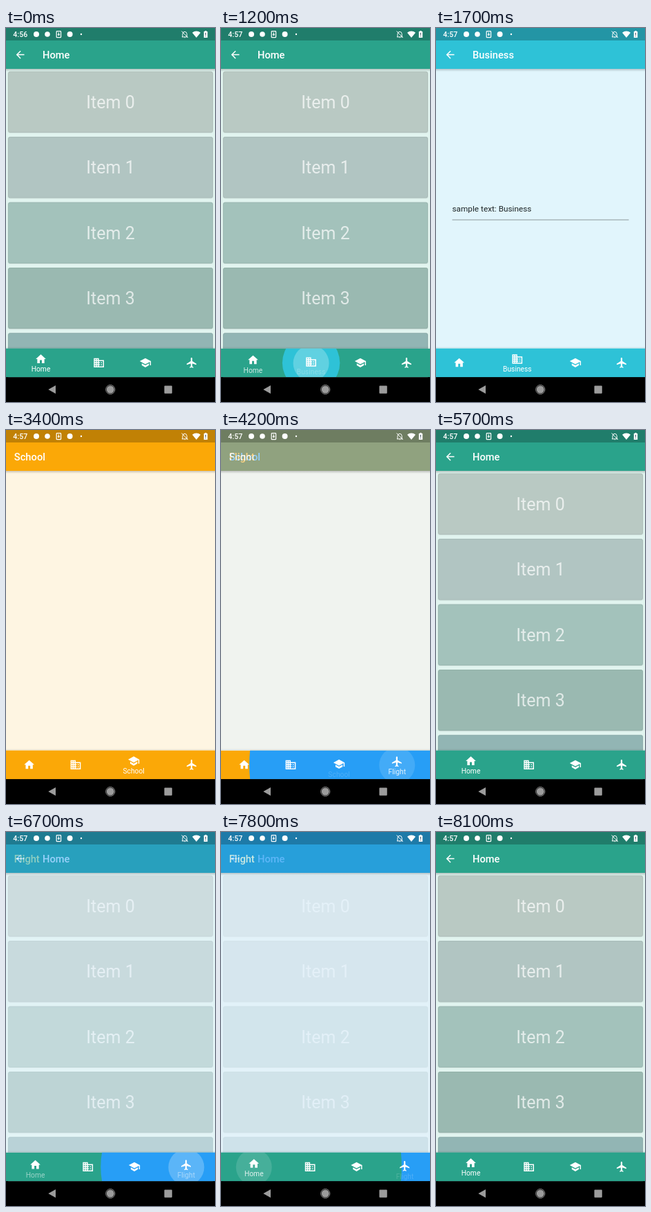
Animation of 303 by 540 pixels, one loop 8.7 s. Source, as an HTML page:

```html
<!DOCTYPE html>
<html lang="en">
<head>
<meta charset="utf-8">
<title>Bottom navigation</title>
<style>
  html, body { margin: 0; width: 100%; height: 100%; overflow: hidden; background: #000; }
  svg { display: block; width: 100vw; height: 100vh; font-family: Roboto, sans-serif; }
  .title { font-size: 14.7px; font-weight: 500; fill: #fff; }
  .item { font-size: 25px; fill: #fff; fill-opacity: .7; text-anchor: middle; }
  .label { font-size: 10.3px; fill: #fff; text-anchor: middle; }
</style>
</head>
<body>
<svg viewBox="0 0 303 540">
  <defs>
    <clipPath id="navClip"><rect y="462.7" width="303" height="41.5"/></clipPath>
    <linearGradient id="shade" x2="0" y2="1">
      <stop stop-opacity=".2"/><stop offset="1" stop-opacity="0"/>
    </linearGradient>
  </defs>
  <g id="pages"></g>

  <g id="status" fill="#fff">
    <text id="clock" x="10.3" y="13.1" font-size="10.6" font-weight="500"></text>
    <circle cx="44" cy="9" r="4"/>
    <circle cx="60" cy="9" r="3.8"/>
    <rect x="73.2" y="4.7" width="6.4" height="9" rx=".8" fill="none" stroke="#fff" stroke-width="1.2"/>
    <path d="M75.8 6.6h1.3v2.3h1.4l-2.1 2.5-2-2.5h1.4z"/>
    <circle cx="92.6" cy="9" r="4"/>
    <circle cx="109" cy="9" r="1.2"/>
    <path d="M256 12V8.500a3.100 3.100 0 0 1 6.200 0V12l1 .9h-8.200zM254.600 4.600l9 9.200" fill="none" stroke="#fff"/>
    <path d="M258 13.600h2.200l-1.100 1z"/>
    <path d="M270 6.700a9.500 9.500 0 0 1 12 0L276 14z"/>
    <path d="M288.300 4h2.400v1h1.500v9h-5.400V5h1.500z"/>
    <path d="M289 7h1v3.200h-1zM289 11.200h1v1h-1z" fill="#456"/>
  </g>

  <rect y="460.700" width="303" height="2" fill-opacity=".06"/>
  <g clip-path="url(#navClip)">
    <rect id="navBase" y="462.7" width="303" height="42"/>
    <circle id="navFill" cy="483.4"/>
    <circle id="touch" cy="484" fill="#fff"/>
    <g id="items"></g>
  </g>
  <rect y="504.2" width="303" height="36"/>
  <g fill="#9c9c9c">
    <path d="M61.300 522l10.700-6v12z"/>
    <circle cx="151.300" cy="522" r="5.500"/>
    <circle cx="151.300" cy="522" r="6.600" fill="none" stroke="#9c9c9c" stroke-width=".9"/>
    <rect x="229.500" y="516.500" width="11.300" height="11.300" rx="1"/>
  </g>
</svg>
<script>
const WIDTH = 303, DP = 0.737, LOOP = 8700, STEP = 100, NAV_TIME = 660, FADE_TIME = 400;

const arrow = 'M20 11H7.83l5.59-5.59L12 4l-8 8 8 8 1.41-1.41L7.83 13H20z';
const cell = (x, y) => `M${x} ${y}v2h2v-2z`;
const windows = [4, 8].flatMap(x => [5, 9, 13, 17].map(y => cell(x, y))).join('');

const screens = [
  { name: 'Home', bar: '#2aa38b', bg: '#e1f4ef', back: true,
    icon: 'M10 20v-6h4v6h5v-8h3L12 3 2 12h3v8z' },
  { name: 'Business', bar: '#2ec2d7', bg: '#e1f5fc', back: true,
    icon: 'M12 7V3H2v18h20V7zM20 19h-8v-2h2v-2h-2v-2h2v-2h-2V9h8z' + windows +
          'M16 11h2v2h-2zM16 15h2v2h-2z' },
  { name: 'School', bar: '#fba807', bg: '#fef5e2',
    icon: 'M5 13.18v4L12 21l7-3.82v-4L12 17zM12 3L1 9l11 6 9-4.91V17h2V9z' },
  { name: 'Flight', bar: '#279ef6', bg: '#e3f2fd',
    icon: 'M21 16v-2l-8-5V3.500c0-.83-.67-1.500-1.500-1.500S10 2.670 10 3.500V9l-8 5v2l8-2.500V19l-2 1.500V22l3.500-1 3.500 1v-1.500L13 19v-5.500z' },
];
const cardColors = ['#b9c9c3', '#b1c5c2', '#a3c2bb', '#9ab9b1', '#92b5b4'];

// first/settled: bounds of the visible change; start: navigation motion; fade: page cross-fade
const moves = [
  { first: 1000, start: 1034, fade: 1200, settled: 1700, from: 0, to: 1 },
  { first: 2800, start: 2776, fade: 2812, settled: 3400, from: 1, to: 2 },
  { first: 3800, start: 3834, fade: 4000, settled: 4500, from: 2, to: 3 },
  { first: 5000, start: 5034, fade: 5300, settled: 5700, from: 3, to: 0 },
  { first: 6500, start: 6476, fade: 6512, settled: 7100, from: 0, to: 3 },
  { first: 7400, start: 7434, fade: 7700, settled: 8100, from: 3, to: 0 },
];
const atRest = { first: 0, start: 0, fade: 0, settled: 0, from: 3, to: 0 };

const $ = id => document.getElementById(id);
const clamp = v => Math.max(0, Math.min(1, v));
const set = (el, attrs) => { for (const k in attrs) el.setAttribute(k, attrs[k]); };
const iconAt = (path, x, y) =>
  `<path d="${path}" fill="#fff" fill-rule="evenodd" transform="translate(${x} ${y}) scale(${DP}) translate(-12 -12)"/>`;

// cubic-bezier(.4, 0, .2, 1)
function fastOutSlowIn(x) {
  let lo = 0, hi = 1;
  for (let i = 0; i < 24; i++) {
    const s = (lo + hi) / 2, r = 1 - s;
    if (1.2 * r * r * s + 0.6 * r * s * s + s ** 3 < x) lo = s; else hi = s;
  }
  return lo * lo * (3 - 2 * lo);
}

const card = (color, i) => {
  const y = 62.7 + 94.4 * i;
  return `<rect x="2.5" y="${y}" width="298" height="89.4" rx="3.5" fill-opacity=".07"/>
    <rect x="3" y="${y}" width="297" height="88.4" rx="3" fill="${color}"/>
    <rect x="3.5" y="${y + 0.5}" width="296" height="87.4" rx="2.5" fill="none" stroke="#000" stroke-opacity=".05"/>
    <text class="item" x="151.5" y="${y + 53}">Item ${i}</text>`;
};
const bodies = {
  Home: cardColors.map(card).join(''),
  Business: `<text x="23.5" y="265.2" font-size="11.8" fill="#1d2527">sample text: Business</text>
    <rect x="23.5" y="276.5" width="256" height="1" fill="#8b989c"/>`,
};

$('pages').innerHTML = screens.map(s => `<g>
  <rect width="303" height="463" fill="${s.bg}"/>
  ${bodies[s.name] || ''}
  <rect y="59" width="303" height="4" fill="url(#shade)"/>
  <rect width="303" height="59" fill="${s.bar}"/>
  <rect width="303" height="18" fill-opacity=".23"/>
  ${s.back ? iconAt(arrow, 20.6, 38.6) : ''}
  <text class="title" x="${s.back ? 53 : 11.8}" y="44.2">${s.name}</text></g>`).join('');
$('items').innerHTML = screens.map(s =>
  `<g>${iconAt(s.icon, 0, 478)}<text class="label" y="496.4">${s.name}</text></g>`).join('');

const pages = [...$('pages').children];
const items = [...$('items').children];

function render(time) {
  const t = Math.floor(time / STEP) * STEP;
  const move = moves.filter(m => t >= m.first).pop() || atRest;
  const { from, to } = move;
  const done = t >= move.settled;
  const x = done ? 1 : (t - move.start) / NAV_TIME;
  const p = done ? 1 : fastOutSlowIn(clamp(x));
  const fade = done ? 1 : clamp((t - move.fade) / FADE_TIME);

  $('clock').textContent = t < 1000 ? '4:56' : '4:57';

  pages.forEach((page, i) => set(page, { opacity: i === to ? fade : i === from && !done ? 1 : 0 }));
  if ($('pages').lastElementChild !== pages[to]) $('pages').append(pages[to]);

  let left = 0, center = 0;
  items.forEach((item, i) => {
    const selected = i === to ? p : i === from ? 1 - p : 0;
    const width = WIDTH / 4.5 * (1 + selected / 2);
    const mid = left + width / 2;
    left += width;
    if (i === to) center = mid;
    set(item, { transform: `translate(${mid} ${5.3 * (1 - selected)})` });
    set(item.lastElementChild, { opacity: selected });
  });

  const reach = Math.hypot(Math.max(center, WIDTH - center), 21);
  set($('navBase'), { fill: screens[done ? to : from].bar });
  set($('navFill'), { cx: center, r: reach * p, fill: screens[to].bar });
  set($('touch'), {
    cx: center,
    r: 26 * clamp((x + 0.15) / 0.3),
    opacity: done ? 0 : 0.24 * clamp((0.8 - x) / 0.45),
  });
}

const begin = performance.now();
function tick() {
  render((performance.now() - begin) % LOOP);
  requestAnimationFrame(tick);
}
tick();
</script>
</body>
</html>
```
